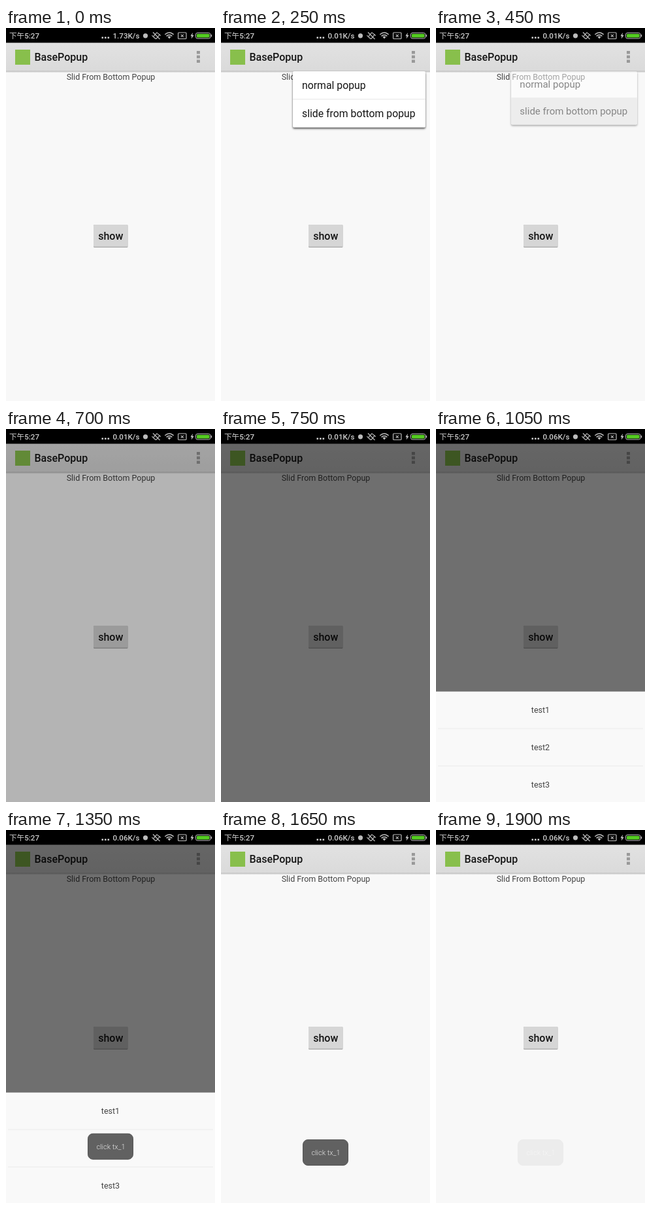
Animation of 320x569 px, one loop 1950 ms. Source, as an HTML page:

```html
<!DOCTYPE html>
<html lang="en">
<head>
<meta charset="utf-8">
<title>Popup demo</title>
<style>
  html, body { margin: 0; width: 100%; height: 100%; overflow: hidden; background: #f8f8f8; }
  svg { display: block; width: 100vw; height: 100vh; font-family: Roboto, "Noto Sans CJK SC", "Noto Sans CJK", sans-serif; }
  .mid { text-anchor: middle; }
  .status { font-size: 11.6px; font-weight: 500; fill: #cecece; }
  .line { fill: none; stroke: #bcbcbc; stroke-width: 1.2; }
  .large { font-size: 16px; fill: #151515; }
  .item { font-size: 15.8px; fill: #151515; }
  .strong { font-weight: 500; }
  .small { font-size: 12.5px; fill: #444; }
</style>
</head>
<body>
<svg viewBox="0 0 320 569">
  <defs>
    <linearGradient id="barFill" x2="0" y2="1">
      <stop stop-color="#e2e2e2"/><stop offset="1" stop-color="#dadada"/>
    </linearGradient>
    <linearGradient id="barShade" x2="0" y2="1">
      <stop stop-color="#b8b8b8"/><stop offset="1" stop-color="#f8f8f8"/>
    </linearGradient>
    <filter id="shadow" x="-10%" y="-10%" width="120%" height="125%">
      <feDropShadow dx="0" dy="2" stdDeviation="1.8" flood-opacity=".7"/>
    </filter>
  </defs>

  <rect width="320" height="569" fill="#f8f8f8"/>
  <text class="small mid" x="160.5" y="78.5">Slid From Bottom Popup</text>
  <rect x="134" y="300" width="52.5" height="35" rx="1.5" fill="#b2b2b2"/>
  <rect x="134" y="300" width="52.5" height="33.5" rx="1.5" fill="#d6d6d6"/>
  <text class="large strong mid" x="160.3" y="323">show</text>

  <rect y="22" width="320" height="44" fill="url(#barFill)"/>
  <rect y="65.5" width="320" height="3" fill="url(#barShade)"/>
  <rect x="14" y="33" width="23" height="23" fill="#88bf4c"/>
  <text class="large strong" x="43.5" y="50">BasePopup</text>
  <path d="M292 35h5v4.5h-5zM292 41.7h5v4.5h-5zM292 48.4h5v4.5h-5z" fill="#999"/>

  <g id="menu">
    <rect width="203" height="85.4" rx="2" fill="#fff" filter="url(#shadow)"/>
    <rect id="pressed" y="42.7" width="203" height="42.7" rx="2" fill="#e4e4e4"/>
    <path d="M0 42.7H203" stroke="#e6e6e6"/>
    <text class="item" x="14" y="26.5">normal popup</text>
    <text class="item" x="14" y="69.5">slide from bottom popup</text>
  </g>

  <g id="popup">
    <rect y="22" width="320" height="547" opacity=".55"/>
    <g id="sheet">
      <rect width="320" height="168.5" fill="#f9f9f9"/>
      <path d="M3 56.5H317M3 113.5H317" stroke="#ebebeb"/>
      <text class="small mid" x="160" y="32">test1</text>
      <text class="small mid" x="160" y="89">test2</text>
      <text class="small mid" x="160" y="146.5">test3</text>
    </g>
  </g>

  <g id="toast">
    <rect x="125.5" y=".5" width="69" height="39" rx="7.5" fill="#616161" stroke="#555"/>
    <text class="mid" x="160.5" y="24" font-size="11" font-weight="300" fill="#e6e6e6">click tx_1</text>
  </g>

  <rect width="320" height="22.5"/>
  <text class="status" x="5" y="15.8">下午5:27</text>
  <path d="M146.5 13.5h2.6v2.6h-2.6zM151 13.5h2.6v2.6h-2.6zM155.5 13.5h2.6v2.6h-2.6z" fill="#cecece"/>
  <text class="status" id="speed" x="163.5" y="15.8"></text>
  <circle cx="213.5" cy="11.8" r="3.6" fill="#bcbcbc"/>
  <g class="line">
    <rect x="227.5" y="7.5" width="5.5" height="8.5" rx="1" transform="rotate(40 230.2 11.8)"/>
    <path d="M225 6.5L235.5 17M223.5 11l1.8 2.5M235 9.5l1.8 2.5"/>
    <path d="M243.3 10Q250 4 256.7 10M245.6 12.4Q250 8.5 254.4 12.4" stroke-width="1.5"/>
    <path d="M247.5 13.6Q250 11.6 252.5 13.6L250 16.6Z" fill="#bcbcbc" stroke="none"/>
    <rect x="263.6" y="7" width="12.4" height="9.5" rx="1"/>
    <path d="M267.8 9.8l4 4M271.8 9.8l-4 4"/>
  </g>
  <path d="M286 7l-3.5 5.2h2l-.8 4.3 3.8-5.5h-2.2z" fill="#ccc"/>
  <rect x="290.5" y="7.5" width="22.5" height="8.5" rx="2.5" fill="none" stroke="#c0c0c0"/>
  <rect x="292" y="9" width="19.5" height="5.5" rx="1.3" fill="#55cc22"/>
  <path d="M314.5 10v3.5" stroke="#c0c0c0" stroke-width="1.3"/>
</svg>
<script>
const LOOP = 1950, STEP = 50;
const $ = id => document.getElementById(id);
const [menu, pressed, popup, sheet, toast, speed] =
  ["menu", "pressed", "popup", "sheet", "toast", "speed"].map($);

const ramp = (t, from, to) => Math.min(1, Math.max(0, (t - from) / (to - from)));
const fade = (el, alpha) => el.setAttribute("opacity", alpha);
const move = (el, y) => el.setAttribute("transform", `translate(0 ${y})`);
const overshoot = u => 1 + (u - 1) ** 2 * (3 * (u - 1) + 2);

function draw(t) {
  speed.textContent = t < 250 ? "1.73K/s" : t < 900 ? "0.01K/s" : "0.06K/s";

  // The menu grows and fades from its top centre.
  const shown = ramp(t, 0, 200) - ramp(t, 350, 550);
  fade(menu, shown);
  menu.setAttribute("transform",
    `translate(211.5 66) scale(${0.9 + 0.1 * shown}) translate(-101.5 0)`);
  fade(pressed, t >= 300 ? 1 : 0);

  fade(popup, ramp(t, 650, 750) - ramp(t, 1450, 1630));
  const rise = (1 - Math.cos(Math.PI * ramp(t, 800, 1050))) / 2;
  move(sheet, 569 - 168.5 * rise);

  // The toast shoots past its resting place and settles.
  fade(toast, ramp(t, 1200, 1320) - ramp(t, 1715, 1915));
  move(toast, 472 + 70 * (1 - overshoot(ramp(t, 1200, 1470))));
}

const start = performance.now();
function tick() {
  const t = (performance.now() - start) % LOOP;
  draw(Math.floor(t / STEP) * STEP);
  requestAnimationFrame(tick);
}
tick();
</script>
</body>
</html>
```
